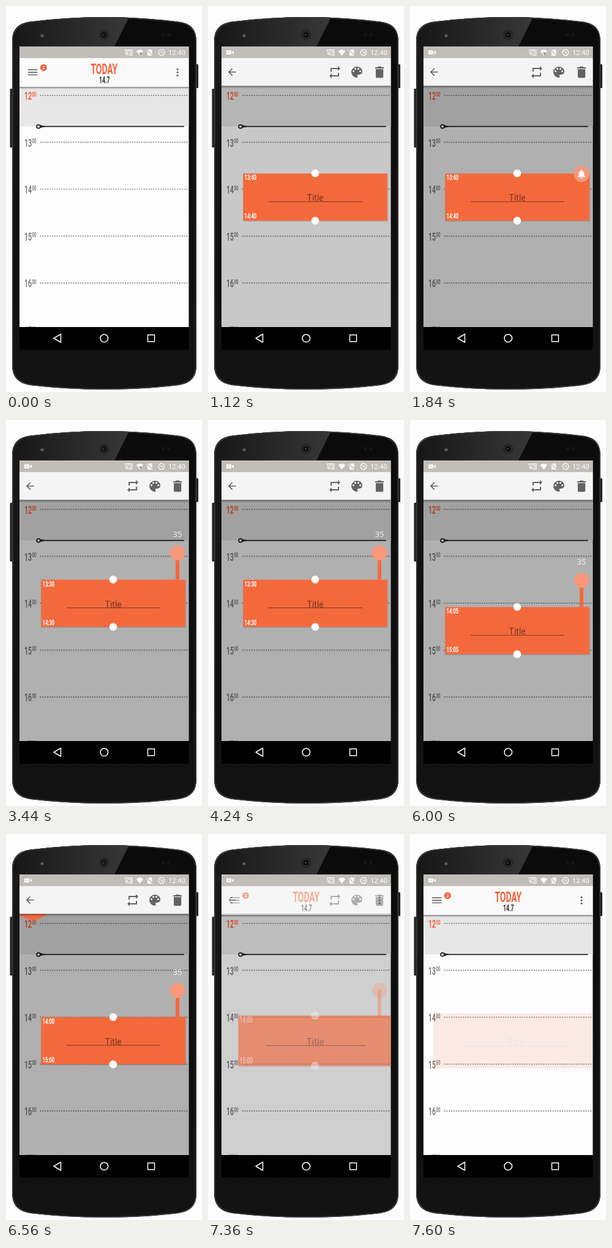
An HTML page for the animation above (7.68 s loop, 320x630 px).

```html
<!DOCTYPE html>
<html lang="en">
<head>
<meta charset="utf-8">
<title>Day planner</title>
<style>
html, body { margin: 0; width: 100%; height: 100%; overflow: hidden; background: #fdfdfd; }
svg { display: block; width: 320px; height: 630px; }
text { font-family: Roboto, "Liberation Sans", sans-serif; }
.mid { text-anchor: middle; }
.narrow { font-weight: 700; }
</style>
</head>
<body>
<svg viewBox="0 0 320 630">
  <defs>
    <linearGradient id="case" x2="0" y2="1">
      <stop offset="0" stop-color="#0b0b0b"/><stop offset="1" stop-color="#131313"/>
    </linearGradient>
    <linearGradient id="gloss">
      <stop offset="0" stop-color="#161616"/><stop offset="1" stop-color="#383838"/>
    </linearGradient>
    <linearGradient id="side" x2="0" y2="1">
      <stop offset="0" stop-color="#1a1a1a"/><stop offset="1" stop-color="#1a1a1a" stop-opacity="0"/>
    </linearGradient>
    <linearGradient id="fall" x2="0" y2="1">
      <stop offset="0" stop-opacity=".4"/><stop offset="1" stop-opacity="0"/>
    </linearGradient>
    <clipPath id="screen"><rect x="22" y="66" width="276.400" height="458"/></clipPath>
    <clipPath id="body"><use href="#shell"/></clipPath>
  </defs>

  <!-- phone -->
  <rect x="6.500" y="135" width="5" height="96" rx="1.500" fill="#252525"/>
  <rect x="310" y="95" width="4" height="39" rx="1.500" fill="#252525"/>
  <path id="shell" d="M10 58C10 38 20 28 40 25.500Q100 18 160 18Q222 18 281 25.500C302 28 311 38 311 58V586C311 606 302 616 281 619Q222 626 160 626Q100 626 40 619C20 616 10 606 10 586Z" fill="url(#case)"/>
  <g clip-path="url(#body)">
    <path d="M9 16H202L177 66H9Z" fill="url(#gloss)"/>
    <rect x="9" y="66" width="13" height="380" fill="url(#side)"/>
    <use href="#outline"/>
  </g>
  <path id="outline" d="M10.800 58C10.800 39 21 29 40 26.300Q100 18.800 160 18.800Q222 18.800 281 26.300C301 29 310.200 39 310.200 58V586C310.200 605 301 615 281 618.200Q222 625.200 160 625.200Q100 625.200 40 618.200C21 615 10.800 605 10.800 586Z" fill="none" stroke="#383838" stroke-width="1.500"/>
  <circle cx="160" cy="47" r="8" fill="#222"/>
  <circle cx="160" cy="47" r="5" fill="#0b0b0d" stroke="#393939"/>
  <circle cx="159.500" cy="47" r="1.800" fill="#38383f"/>
  <circle cx="59" cy="48.500" r="3.300" fill="#343841"/>
  <circle cx="59" cy="48.500" r="1.500" fill="#6f7884"/>
  <circle cx="257" cy="47" r="3" fill="#151515"/>
  <circle cx="266" cy="47" r="3" fill="#151515"/>
  <rect x="22" y="523" width="276.400" height="38"/>
  <g fill="none" stroke="#fff" stroke-width="1.500" stroke-linejoin="round">
    <path d="M89.500 535.500V549L78 542.250Z"/>
    <circle cx="160.300" cy="542.300" r="6.300"/>
    <rect x="231.500" y="536.800" width="11" height="11"/>
  </g>

  <g clip-path="url(#screen)">
    <rect x="22" y="66" width="277" height="458" fill="#fdfdfd"/>
    <rect x="22" y="130" width="277" height="66.500" fill="#e7e7e8"/>
    <g id="hours"></g>
    <path d="M56 194.300Q60 196 65 195.700H290a.9 .9 0 0 1 0 1.800H65Q60 197.300 56 199Z" fill="#222"/>
    <circle cx="53" cy="196.700" r="2.900" fill="#fff" stroke="#222" stroke-width="1.700"/>
    <rect id="dim" x="22" y="130" width="277" height="394"/>
    <circle id="bulge" cx="44" cy="107" fill="#f4693c"/>

    <!-- event, drawn with its top at 0 -->
    <g id="event">
      <rect id="stem" x="277" width="6" fill="#f4693c"/>
      <g id="card">
        <rect x="57" y="1.500" width="236.500" height="77" opacity=".14"/>
        <rect x="57.500" y="0" width="235.500" height="77" fill="#f4693c"/>
        <text class="mid" x="175.200" y="45" font-size="14" opacity=".5">Title</text>
        <path d="M99 46H252" stroke="#000" stroke-opacity=".5"/>
        <g id="marks">
          <g id="from"></g><g id="till"></g>
          <circle cx="175" cy="-.2" r="6.300" fill="#fff"/>
          <circle cx="175" cy="77" r="6.300" fill="#fff"/>
        </g>
      </g>
      <g id="knob">
        <circle id="disc" cx="280" cy="1" r="12.500" fill="#f8977a"/>
        <path id="bell" fill="#fff" transform="translate(271.400 -7.800) scale(.72)" d="M12 22c1.100 0 2-.9 2-2h-4a2 2 0 0 0 2 2zm6-6v-5c0-3.070-1.640-5.640-4.500-6.320V4a1.500 1.500 0 0 0-3 0v.68C7.630 5.360 6 7.920 6 11v5l-2 2v1h16v-1z"/>
        <text id="count" class="mid" x="280" y="-24.500" font-size="13" fill="#f2f2f2" style="font-family:'Open Sans','Noto Sans',sans-serif"></text>
      </g>
    </g>

    <!-- toolbars -->
    <g id="dayBar">
      <rect x="22" y="132" width="277" height="4" fill="url(#fall)"/>
      <rect x="22" y="85" width="277" height="47.500" fill="#fafafa"/>
      <path d="M22 132.500H299" stroke="#8d8d8d"/>
      <path d="M36 104H51.500M36 108.200H51.500M36 112.400H51.500" stroke="#555" stroke-width="1.400"/>
      <circle cx="61.300" cy="100.500" r="5.500" fill="#f4623a"/>
      <text class="mid" x="61.300" y="103.300" font-size="7.500" font-weight="700" fill="#fff">2</text>
      <g id="heading"></g>
      <g fill="#5c5c5c"><circle cx="280" cy="103.200" r="1.500"/><circle cx="280" cy="108.200" r="1.500"/><circle cx="280" cy="113.200" r="1.500"/></g>
    </g>
    <g id="editBar">
      <rect x="22" y="130" width="277" height="5" fill="url(#fall)"/>
      <rect x="22" y="85" width="277" height="45.500" fill="#f4f4f4"/>
      <path d="M22 130.500H299" stroke="#777" stroke-opacity=".7"/>
      <g fill="#636363">
        <path transform="translate(29.600 98.200) scale(.8)" d="M20 11H7.830l5.590-5.590L12 4l-8 8 8 8 1.410-1.410L7.830 13H20z"/>
        <path transform="translate(195 96)" d="M7 7h10v3l4-4-4-4v3H5v6h2zm10 10H7v-3l-4 4 4 4v-3h12v-6h-2z"/>
        <g transform="translate(231 96)">
          <path d="M12 3a9 9 0 0 0 0 18 1.500 1.500 0 0 0 1.100-2.500A1.500 1.500 0 0 1 14.200 16H16a5 5 0 0 0 5-5c0-4.400-4-8-9-8z"/>
          <g fill="#f4f4f4"><circle cx="6.500" cy="10.500" r="1.500"/><circle cx="9.500" cy="6.500" r="1.500"/><circle cx="14.500" cy="6.500" r="1.500"/><circle cx="17.500" cy="10.500" r="1.500"/></g>
        </g>
        <path transform="translate(267.800 95.800) scale(1.020)" d="M6 19c0 1.100.9 2 2 2h8c1.100 0 2-.9 2-2V7H6zM19 4h-3.500l-1-1h-5l-1 1H5v2h14z"/>
      </g>
    </g>

    <!-- status bar -->
    <rect x="22" y="66" width="277" height="19" fill="#c1bdb9"/>
    <g id="rec">
      <path d="M30 72.500H38V79H30ZM38.500 75.700L42 72.800V78.700Z" fill="#fff"/>
      <path d="M32 75.700H36" stroke="#c1bdb9"/>
    </g>
    <g fill="none" stroke="#fff" stroke-width="1.200">
      <path d="M194.600 73.500V71.600H205.800V80.400H201.500M194.600 75.200a5.200 5.200 0 0 1 5.200 5.200M194.600 77.700a2.700 2.700 0 0 1 2.700 2.700"/>
      <path d="M197.500 74H203.500V78H201" stroke-width="1"/>
      <circle cx="254" cy="75.800" r="4.900"/>
      <path d="M251.800 74.500H253.500V77.500M255.300 74V77.500H256.500" stroke-width=".9"/>
    </g>
    <path d="M212.800 73.500Q218.500 69 224.200 73.500L218.500 81Z" fill="#fff"/>
    <path id="net" d="M217 76H222L219.500 80.500Z" fill="#8f8b88"/>
    <path d="M231 73.500L233.500 71H238.500V81H231Z" fill="#fff"/>
    <path d="M229 71L239.500 81.500" stroke="#c1bdb9" stroke-width="2.200"/>
    <path d="M229 72L238.800 81.800" stroke="#fff"/>
    <text x="265" y="80" font-size="11.200" fill="#fff">12:40</text>
  </g>
</svg>
<script>
const LOOP = 7680, STEP = 80, HOUR = 76.6, NOON = 145.8;
const NARROW = 0.59;   // one condensed face for headings and hours
const el = {};
document.querySelectorAll('[id]').forEach(e => el[e.id] = e);
const set = (e, attrs) => { for (const k in attrs) e.setAttribute(k, attrs[k]); };

function narrow(x, y, size, fill, str, cls = '') {
  return `<text class="narrow ${cls}" transform="translate(${x} ${y}) scale(${NARROW} 1)"` +
    ` font-size="${size}" fill="${fill}">${str}</text>`;
}

for (let i = 0; i < 6; i++) {
  const y = NOON + i * HOUR, fill = i ? '#808080' : '#f4623a';
  el.hours.innerHTML += narrow(30, y + 7.1, 18, fill, 12 + i) + narrow(42.5, y + 1.8, 10.5, fill, '00') +
    `<path d="M55.500 ${y}H299" stroke="#858585" stroke-width="1.700" stroke-dasharray="2 1.850"/>`;
}
el.heading.innerHTML = narrow(160.3, 111, 23.5, '#f4623a', 'TODAY', 'mid') +
  narrow(160.8, 126, 15, '#333', '14.7', 'mid');
for (const [g, y] of [[el.from, 11], [el.till, 74]]) g.innerHTML = narrow(59.5, y, 13, '#fff', '');

// [time, value] points, linear in between
const tracks = {
  dim: [[800, 0], [1120, .21], [1280, .255], [1600, .305], [7200, .305], [7600, 0]],
  edit: [[800, 0], [1040, 1], [7200, 1], [7520, 0]],
  fade: [[800, 0], [1040, 1], [7200, 1], [7600, .12], [7680, 0]],
  scale: [[800, 1.2], [1040, 1], [7200, 1], [7600, 1.165]],
  start: [[1840, 100], [2080, 90], [4560, 90], [5040, 130], [5760, 130], [6160, 120]],
  bell: [[1600, 0], [1840, 1], [7200, 1], [7440, 0]],
  lead: [[2480, 0], [3040, 35]],
  bulge: [[6160, 22], [6560, 33], [6720, 33], [6880, 20]],
  marks: [[7200, 1], [7520, 0]]
};

function at(points, t) {
  if (t <= points[0][0]) return points[0][1];
  for (let i = 1; i < points.length; i++) {
    const [a, u] = points[i - 1], [b, v] = points[i];
    if (t <= b) return u + (v - u) * (t - a) / (b - a);
  }
  return points[points.length - 1][1];
}

const snap = v => Math.round(v / 5) * 5;
const clock = m => `${12 + Math.floor(m / 60)}:${String(m % 60).padStart(2, '0')}`;
const between = (t, a, b) => t >= a && t < b;

function draw(t) {
  const s = {};
  for (const k in tracks) s[k] = at(tracks[k], t);
  const start = snap(s.start), lead = snap(s.lead), rise = lead * HOUR / 60;

  set(el.dim, { opacity: s.dim });
  set(el.bulge, { r: s.bulge, opacity: s.bulge > 23 ? 1 : 0 });
  set(el.dayBar, { opacity: s.edit < 1 ? 1 : 0 });
  set(el.editBar, { opacity: s.edit });

  set(el.event, { transform: `translate(0 ${NOON + start * HOUR / 60 - .1})` });
  set(el.card, {
    opacity: s.fade,
    transform: `translate(175.250 38.500) scale(${s.scale}) translate(-175.250 -38.500)`
  });
  set(el.marks, { opacity: s.marks });
  el.from.firstChild.textContent = clock(start);
  el.till.firstChild.textContent = clock(start + 60);

  set(el.stem, { y: -rise, height: rise, opacity: s.bell });
  set(el.knob, { transform: `translate(0 ${-rise})`, opacity: s.bell });
  set(el.disc, { r: lead ? 12.2 : 12.8 });
  set(el.bell, { opacity: lead ? 0 : 1 });
  el.count.textContent = lead || '';

  set(el.rec, { opacity: t < 80 ? 0 : 1 });
  const busy = t < 80 || between(t, 1680, 2560) || between(t, 3440, 3840);
  set(el.net, { opacity: busy ? 1 : 0 });
}

const origin = performance.now();
function tick() {
  const t = (performance.now() - origin) % LOOP;
  draw(Math.floor(t / STEP) * STEP);
  requestAnimationFrame(tick);
}
tick();
</script>
</body>
</html>
```
